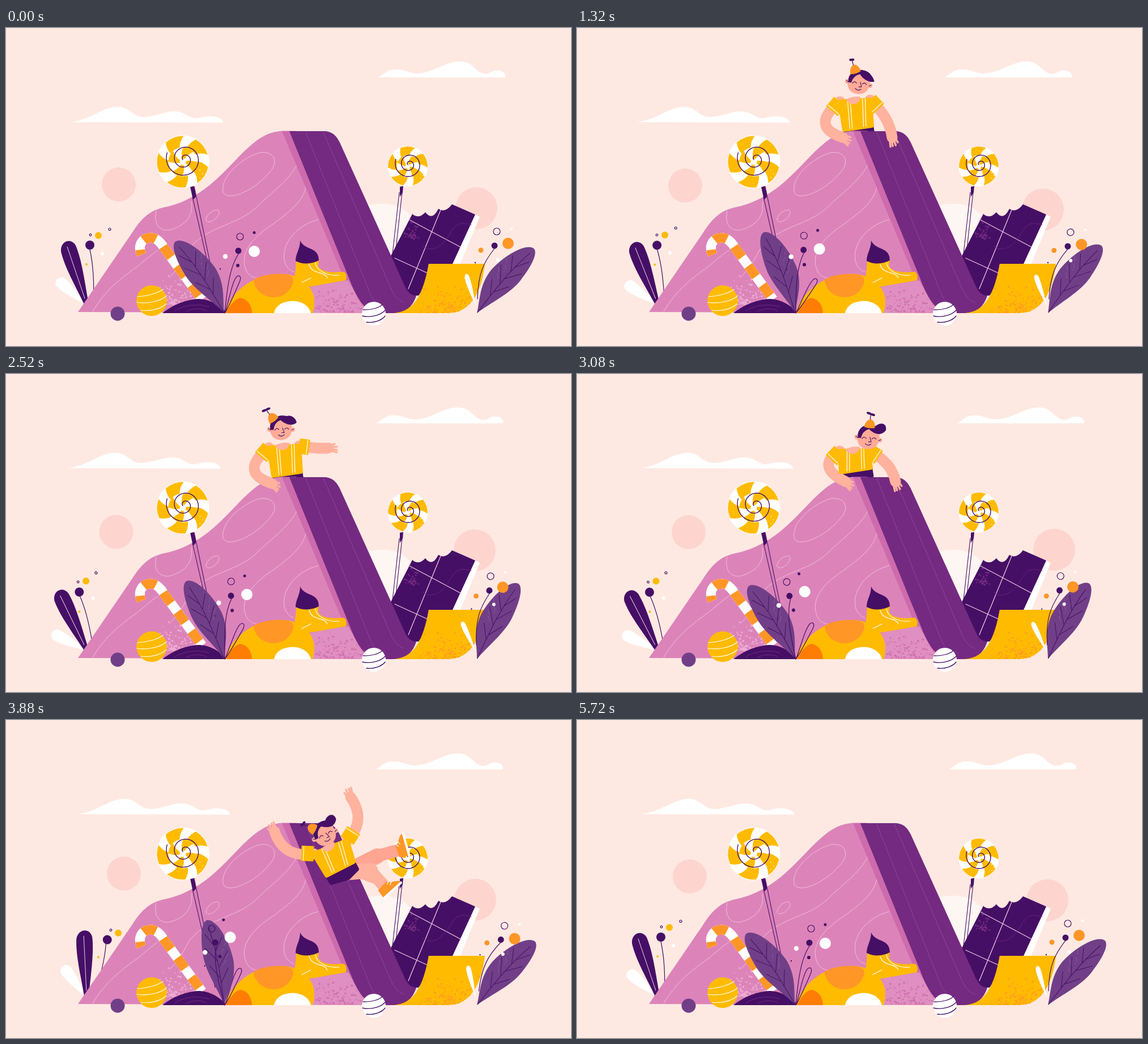
Write an HTML page with a canvas that moves like this. It is 997x561 px and loops after 5.76 s.

```html
<!DOCTYPE html>
<html lang="en">
<head>
<meta charset="utf-8">
<title>Candy slide</title>
<style>
html, body { margin: 0; width: 100%; height: 100%; overflow: hidden; background: #fee9e2; }
canvas { display: block; width: 997px; height: 561px; }
</style>
</head>
<body>
<canvas id="stage" width="997" height="561"></canvas>
<script>
const c = document.getElementById('stage').getContext('2d');
const LOOP = 5760, STEP = 40;
const SKY = '#fee9e2', WHITE = '#fff', DARK = '#460f66', PURPLE = '#742a80', LEAF = '#713f87',
  PINK = '#dc84b9', PALE = '#f2bbde', GOLD = '#ffbb00', ORANGE = '#ff9626', SKIN = '#ffb29e', BLUSH = '#fdd5ce';

// ---------- drawing helpers ----------
const paths = {};
const path = d => paths[d] || (paths[d] = new Path2D(d));
const fill = (d, color) => { c.fillStyle = color; c.fill(path(d)); };
const line = (d, color, w = 1.2) => {
  c.strokeStyle = color; c.lineWidth = w; c.lineCap = 'round'; c.stroke(path(d));
};
const disc = (x, y, r, color) => {
  c.fillStyle = color; c.beginPath(); c.arc(x, y, r, 0, 7); c.fill();
};
function at(x, y, deg, draw, scale = 1) {
  c.save(); c.translate(x, y); c.rotate(deg * Math.PI / 180); c.scale(scale, scale); draw(); c.restore();
}
function poly(pts, color) {
  c.fillStyle = color; c.beginPath();
  pts.forEach(p => c.lineTo(p[0], p[1]));
  c.closePath(); c.fill();
}
function limb(pts, w, color, cap = 'round') {
  c.strokeStyle = color; c.lineWidth = w; c.lineCap = cap; c.lineJoin = 'round';
  c.beginPath(); pts.forEach(p => c.lineTo(p[0], p[1])); c.stroke();
}
function speckle(shape, x, y, rx, ry, n, color) {
  let seed = x * 31 + y;
  const rnd = () => (seed = (seed * 16807 + 11) % 2147483647) / 2147483647;
  c.save(); c.clip(path(shape));
  for (let i = 0; i < n; i++) {
    const gx = rnd() + rnd() - 1, gy = 1 - 2 * rnd() * rnd();
    disc(x + gx * rx, y + gy * ry, .6 + rnd() * 1.3, color);
  }
  c.restore();
}

// ---------- motion helpers ----------
// Monotone cubic through the keys, so held values stay put.
function curve(ts, vs, t) {
  const last = ts.length - 1;
  if (t <= ts[0]) return vs[0];
  if (t >= ts[last]) return vs[last];
  let i = 0;
  while (t >= ts[i + 1]) i++;
  const slope = k => (vs[k + 1] - vs[k]) / (ts[k + 1] - ts[k]);
  const tangent = k => {
    if (k === 0 || k === last) return 0;
    const a = slope(k - 1), b = slope(k);
    return a * b <= 0 ? 0 : 2 * a * b / (a + b);
  };
  const h = ts[i + 1] - ts[i], u = (t - ts[i]) / h, v = 1 - u;
  return vs[i] * (1 + 2 * u) * v * v + tangent(i) * h * u * v * v
    + vs[i + 1] * u * u * (3 - 2 * u) - tangent(i + 1) * h * u * u * v;
}
const times = [0, 300, 640, 1340, 2040, 3080, 3880, 4520, LOOP];
const sway = {
  cloudL: [0, -8, -14, -8, -6, -2, 12, -14, 0],
  cloudR: [0, 0, 0, -8, -18, 14, -4, 12, 0],
  sunLx: [0, -6, -11, -8, -6, -2, 9, -12, 0],
  sunLy: [0, 1, 2, 2, 2, 3, -5, -1, 0],
  sunRx: [0, 0, 0, -8, -15, 12, -2, 10, 0],
  sunRy: [0, 6, 10, 2, -5, -8, -1, 2, 0],
  leafL: [-17, -25, -17, -20, -22.5, -25.5, -1, -15, -17],
  budL: [-48, -62, -35, -55, -60, -63, -36, -47, -48],
  stemL: [0, -8, 14.4, -4, -8.8, -11, 17, 2.2, 0],
  leafC: [-34, -28, -22, -21, -20.5, -32, -11, -20, -34],
  stemC: [0, -8, -23, -5, 1, -18, -21, 5, 0],
  loopC: [20, 27, 33, 30, 28, 24, 22, 21, 20],
  leafR: [41, 35, 17, 38, 29, 28, 42, 41.5, 41],
  stemR: [0, -6, -15.6, 2, -3, -5, 5.5, 3, 0],
  budR: [-17, -24, -30, -20, -23, -26, -14, -15, -17]
};

// ---------- scenery ----------
const HILL = 'M127 501L222 362C238 337 252 323 276 317C350 303 388 248 422 216C447 192 466 181.5 492 181.5H512L645 503Z';
const SLIDE = 'M500 182H560C576 182 583 190 589 202L704 456C709 467 716 472 724 472C718 492 704 503 688 503H658C636 503 622 480 612 458Z';
const RAMP = 'M746 416H845C841 450 830 485 803 498C794 503 780 503 760 503H685C720 500 736 470 746 416Z';
const CHOC = 'M717 328Q728 338 740 325Q752 341 763 319Q775 327 787 311L828 329L788 416H746C742 440 738 460 728 472H708L676 408Z';
const PATCH = 'M538 456L604 445L624 484L640 502H538Z';

function backdrop(s) {
  c.fillStyle = SKY; c.fillRect(0, 0, 997, 561);
  disc(199 + s.sunLx, 276 + s.sunLy, 30, BLUSH);
  disc(830 + s.sunRx, 318 + s.sunRy, 37, BLUSH);
  at(s.cloudL, 0, 0, () => fill('M114 166C150 162 170 139 197 139C220 139 222 158 245 157C265 156 280 147 297 147C318 147 322 161 338 159C350 157 354 155 364 156C376 157 383 161 383 167Z', WHITE));
  at(s.cloudR, 0, 0, () => fill('M657 87C668 81 672 73 688 73C705 73 712 81 727 80C755 79 775 59 801 59C826 59 828 80 846 81C855 81 856 75 867 75C877 75 882 80 881 87Z', WHITE));
  fill('M634 314C655 308 682 308 698 318C708 324 714 330 716 337L684 410Z', '#fef6f3');
}

// Two checkered rings of curved wedges under a spiral line.
function lolli(x, y, r, turn) {
  disc(x, y, r, WHITE);
  at(x, y, turn, () => {
    const p = (rad, a) => [Math.cos(a) * rad, Math.sin(a) * rad];
    const wedge = (r0, r1, a0, w, twist) => {
      const mid = (r0 + r1) / 2, a1 = a0 + twist;
      c.fillStyle = GOLD; c.beginPath();
      c.arc(0, 0, r0, a0 + w, a0, true);
      c.quadraticCurveTo(...p(mid, a0 + twist * .2), ...p(r1, a1));
      c.arc(0, 0, r1, a1, a1 + w);
      c.quadraticCurveTo(...p(mid, a0 + w + twist * .2), ...p(r0, a0 + w));
      c.fill();
    };
    for (let i = 0; i < 5; i++) wedge(r * .55, r * .98, i * Math.PI * .4, .76, .25);
    for (let i = 0; i < 4; i++) wedge(r * .12, r * .55, i * Math.PI * .5 + .7, .8, .3);
  });
  c.strokeStyle = DARK; c.lineWidth = 1.4; c.lineCap = 'round'; c.beginPath();
  for (let i = 0; i <= 90; i++) {
    const k = i / 90, a = 3.5 - k * 13.2, rad = r * (.64 * (1 - k) + .06);
    c.lineTo(x + r * .06 + Math.cos(a) * rad, y - r * .1 + Math.sin(a) * rad);
  }
  c.stroke();
  for (let i = 0; i < 7; i++) disc(x + r * (.6 + .05 * (i % 4)), y + r * (.25 + .07 * i), .8, i % 2 ? WHITE : GOLD);
}

function hill() {
  fill(HILL, PINK);
  c.save(); c.clip(path(HILL));
  [
    'M383 280C386 255 420 228 447 220C470 216 480 232 470 248C455 270 425 292 400 296C386 297 381 292 383 280',
    'M353 338C354 328 366 320 374 321C381 325 370 341 358 342C354 342 353 340 353 338',
    'M265 323C260 345 270 360 290 356C318 348 331 330 327 306',
    'M153 500C175 462 205 440 230 422C245 410 258 398 268 392',
    'M518 232C503 268 470 288 440 318C405 350 350 350 322 392C310 415 300 430 288 440',
    'M530 262C534 300 505 320 474 344C430 372 412 400 424 428C430 440 440 442 455 442',
    'M551 338C515 347 486 378 491 410C493 420 500 428 508 430'
  ].forEach(d => line(d, PALE, 1));
  c.restore();
  fill('M487 182H501L613 458L600 450Z', '#cd6bad');
  fill(PATCH, '#df8fc1');
  speckle(PATCH, 585, 480, 60, 34, 260, '#d070af');
  speckle(HILL, 300, 462, 55, 26, 150, '#ecadd5');
}

function slide() {
  fill(SLIDE, PURPLE);
  line('M529 184L640 462C646 478 652 488 668 490', '#8a479a', 1);
  line('M560 184L676 452C682 468 690 480 702 484', '#8a479a', 1);
}

function chocolate() {
  poly([[826, 328], [836, 333], [801, 417], [788, 417]], WHITE);
  fill(CHOC, DARK);
  line('M711 338L803 387M686 406L743 432M767 321L710 460', '#e9c9df', 1.3);
  line('M735 385C752 398 772 384 784 362S808 344 821 347', '#672379', 1);
  speckle(CHOC, 716, 352, 16, 20, 40, '#742a80');
}

function ramp() {
  fill(RAMP, GOLD);
  speckle(RAMP, 785, 478, 66, 28, 260, '#ffa01e');
}

function cane() {
  const d = 'M239 400C231 380 243 370 255 370C266 370 273 378 279 388L346 479';
  c.lineCap = 'butt'; c.lineWidth = 17;
  c.strokeStyle = WHITE; c.stroke(path(d));
  c.strokeStyle = ORANGE; c.setLineDash([23, 19]); c.lineDashOffset = 14;
  c.stroke(path(d)); c.setLineDash([]);
}

function sweets() {
  fill('M326 281L333 279L337 299L371 472H368L330 301Z', '#d77fb5');
  line('M329 298L369 472M336 298L372 472', DARK, 1.1);
  fill('M325 280L332 279L336 297L330 303Z', DARK);
  lolli(312, 236, 46.5, -146);
  cane();
  fill('M276 503C300 484 325 478 342 478C362 479 378 490 390 503Z', DARK);
  line('M298 499C315 488 340 486 358 492M318 500C330 494 345 494 354 499', PURPLE, 1);

  fill('M386 503C395 470 430 436 480 434C522 432 544 458 544 482C544 495 541 503 541 503Z', GOLD);
  fill('M512 406C512 425 509 440 507 452L538 456L600 445C602 437 600 431 595 430C576 432 556 431 551 420L552 406Z', GOLD);
  fill('M437 444C447 437 470 433 488 434C503 435 508 440 507 446C504 466 486 476 470 475C450 473 438 460 437 444Z', ORANGE);
  fill('M388 503C394 490 404 478 413 476C428 478 434 492 434 503Z', '#ff7d05');
  fill('M473 503C476 488 490 482 506 481.5C522 482 535 490 538 503Z', WHITE);
  fill('M519 375C519 390 511 398 511 411C525 418 540 416 552 410C552 396 544 392 534 388C527 385 522 381 519 375Z', DARK);
  line('M535 417C540 436 562 428 567 441M546 414C548 430 570 438 588 436M522 449L538 441', WHITE, 1.2);
}

function balls() {
  disc(197, 504, 12.5, LEAF);
  disc(257, 481, 27, GOLD);
  line('M232 474C250 473 268 468 277 461M231 484C250 487 272 482 283 473M238 498C255 500 272 496 282 487', WHITE, 1.1);
  disc(649, 504, 21, WHITE);
  line('M630 497C645 498 659 493 664 488M629 508C646 512 663 505 669 498M636 519C650 521 664 515 669 508', DARK, 1.3);
}

// ---------- plants ----------
function dots(list) {
  list.forEach(([x, y, r, color, ring]) => {
    if (!ring) return disc(x, y, r, color);
    c.strokeStyle = color; c.lineWidth = 1.2; c.beginPath(); c.arc(x, y, r, 0, 7); c.stroke();
  });
}
function bigLeaf(flip) {
  c.scale(flip, 1);
  fill('M0 0C-6 -30 -22 -65 -20 -95C-18 -130 -11 -151 -1 -152C15 -151 30 -112 31 -75C30 -40 10 -20 0 0Z', LEAF);
  line('M0 -2C3 -50 6 -90 -1 -140M2 -38L19 -62M3 -66L24 -92M3 -95L19 -118M2 -48L-12 -72M3 -78L-14 -104M2 -106L-10 -128', DARK, 1);
  for (let i = 0; i < 14; i++) disc(12 + (i * 7) % 13, -70 - (i * 11) % 42, .7, '#9a70ab');
}
function leftPlant(s) {
  at(139, 487, s.budL, () => fill('M0 0C-5 -20 -12 -44 -10 -58C-8 -68 8 -68 10 -57C11 -44 6 -20 3 0Z', WHITE));
  at(148, 488, s.stemL, () => {
    line('M0 -97C6 -70 8 -40 6 0', DARK, 1.2);
    dots([[0, -105, 8, DARK], [15, -122, 6, GOLD], [1, -123, 1.8, DARK, 1], [35, -133, 2, DARK, 1],
      [22, -90, 3, WHITE], [-6, -71, 2, GOLD]]);
  });
  at(141, 487, s.leafL, () => {
    fill('M-3 0C-8 -35 -17 -72 -15 -101C-12 -119 9 -121 13 -104C16 -76 9 -35 5 0Z', DARK);
    line('M1 -10C0 -45 -1 -75 -2 -106', '#e7cfe6', 1);
  });
}
function midPlant(s) {
  at(387, 502, s.loopC, () => line('M0 0C-2 -25 -7 -55 -3 -66C1 -73 6 -68 5 -58C4 -40 3 -20 0 0', DARK, 1.2));
  at(385, 502, s.leafC, () => bigLeaf(1));
  at(388, 503, s.stemC, () => {
    line('M22 -104C6 -80 2 -40 -2 0', DARK, 1.2);
    dots([[22, -110, 5.5, DARK], [25, -135, 6, DARK, 1], [50, -142, 2.5, DARK], [50, -109, 10, WHITE],
      [-1, -100, 4.2, WHITE], [21, -84, 3, DARK], [-10, -78, 1.2, DARK]]);
  });
}
function rightPlant(s) {
  at(829, 490, s.budR, () => fill('M0 0C-3 -20 -6 -45 -4 -54C-2 -60 3 -60 4 -53C5 -40 2 -18 0 0Z', WHITE));
  at(831, 503, s.leafR, () => bigLeaf(-1));
  at(831, 503, s.stemR, () => {
    line('M31 -114C12 -90 2 -70 1 -25', DARK, 1.2);
    dots([[31, -119, 5.5, DARK], [55, -123, 10, ORANGE], [35, -144, 6, DARK, 1], [7, -111, 4.5, ORANGE],
      [37, -94, 3, WHITE], [-3, -89, 1.2, DARK], [61, -149, 2.2, WHITE]]);
  });
}

// ---------- boy ----------
// s shoulder, h hip, e elbow, w wrist, k knee, f foot; head: x, y, tilt, cap tilt, quiff
const stand = {
  sL: [464, 130], sR: [517, 127], hR: [520, 172], hL: [472, 179],
  eL: [431, 169], wL: [469, 193], eR: [546, 158], wR: [556, 193],
  head: [497, 98, 8, -16, 0],
  kA: [500, 220], fA: [500, 250], kB: [510, 220], fB: [510, 250]
};
const wave = { ...stand, head: [481, 98, -8, -45, .6], eR: [548, 113], wR: [576, 89] };
const waveBack = { ...wave, eR: [545, 108], wR: [566, 76], head: [483, 98, -5, -40, .6] };
const crouch = {
  ...stand, sL: [464, 136], sR: [514, 135], hR: [518, 165], hL: [466, 173],
  eL: [438, 163], wL: [474, 190], eR: [549, 158], wR: [562, 190], head: [514, 114, 5, 6, 1]
};
const ride = {
  sL: [543, 236], sR: [602, 213], hR: [613, 250], hL: [566, 274],
  eL: [497, 234], wL: [474, 197], eR: [625, 176], wR: [608, 136],
  head: [563, 203, -25, -63, 1],
  kA: [643, 266], fA: [671, 297], kB: [655, 240], fB: [698, 228]
};
const tuck = {
  sL: [916, 163], sR: [946, 161], hR: [946, 192], hL: [908, 196],
  eL: [948, 182], wL: [962, 176], eR: [962, 172], wR: [975, 176],
  head: [964, 137, 4, -2, 1],
  kA: [974, 179], fA: [953, 240], kB: [1004, 204], fB: [970, 262]
};
const move = (pose, dx, dy) => Object.fromEntries(
  Object.entries(pose).map(([k, [x, y, ...rest]]) => [k, [x + dx, y + dy, ...rest]]));
const hop = { ...move(crouch, 14, -34), kA: [565, 165], fA: [575, 195], kB: [575, 160], fB: [592, 190] };

const keys = [
  [120, move(stand, 0, 145)], [480, move(stand, 0, -4)], [640, stand], [1400, stand],
  [1680, wave], [1860, waveBack], [2040, wave], [2220, waveBack], [2400, wave],
  [2700, stand], [3080, crouch], [3320, hop], [3640, move(ride, -35, -75)], [3880, ride],
  [4020, move(ride, 100, 195)], [4100, move(ride, 180, 185)], [4200, move(ride, 255, 90)],
  [4360, move(tuck, -42, 45)], [4520, tuck], [4640, move(tuck, 45, 30)], [4800, move(tuck, 130, 180)]
];
const keyTimes = keys.map(k => k[0]);
const poseAt = t => Object.fromEntries(Object.keys(stand).map(name =>
  [name, stand[name].map((_, i) => curve(keyTimes, keys.map(k => k[1][name][i]), t))]));
const mix = (a, b, k) => [a[0] + (b[0] - a[0]) * k, a[1] + (b[1] - a[1]) * k];
const angle = (a, b) => Math.atan2(b[1] - a[1], b[0] - a[0]) * 180 / Math.PI;

function hand(e, w) {
  at(w[0], w[1], angle(e, w), () => {
    disc(1, 0, 8.5, SKIN);
    [-6, -2, 2.5, 6].forEach((y, i) => limb([[2, y * .8], [i === 0 ? 11 : 15, y * 1.2]], 3.6, SKIN));
  });
}
function arm(s, e, w) {
  const bend = mix(mix(s, w, .5), e, 1.6);
  c.strokeStyle = SKIN; c.lineWidth = 19; c.lineCap = 'round'; c.beginPath();
  c.moveTo(...s); c.quadraticCurveTo(...bend, ...w); c.stroke();
  hand(e, w);
}
function sleeve(s, e) {
  const len = Math.hypot(e[0] - s[0], e[1] - s[1]) || 1, end = mix(s, e, Math.min(.6, 22 / len));
  limb([s, end], 27, GOLD, 'butt');
  at(end[0], end[1], angle(s, e), () => line('M-4 -12V12', WHITE, 1.2));
}
function leg(hip, k, f, color) {
  poly([hip, k, f], color);
  limb([hip, k], 27, color);
  limb([k, f], 22, color);
  at(f[0], f[1], angle(k, f) - 90, () => {
    fill('M-13 -7L8 -9C11 -1 24 0 27 9H-15Z', ORANGE);
    fill('M-16 8H28V10Q28 12 25 12H-16Z', WHITE);
    line('M6 -4L11 -7M9 0L15 -3', WHITE, 1.2);
  });
}
function face([x, y, tilt, cap, quiff], t) {
  at(x, y, tilt, () => {
    disc(-22, -1, 4.5, SKIN); disc(22, 1, 4.5, SKIN);
    fill('M-20 -12C-10 -23 14 -22 20 -10C23 6 17 19 0 20C-16 20 -24 8 -20 -12Z', '#ffab98');
    const q = quiff;
    c.fillStyle = DARK; c.beginPath(); c.moveTo(-20, 0);
    c.bezierCurveTo(-23, -22, -4, -30, 12, -25);
    c.bezierCurveTo(18 + 3 * q, -24 - 10 * q, 27 + 6 * q, -14 - 18 * q, 29 + 3 * q, -8 - 11 * q);
    c.bezierCurveTo(22 + 3 * q, -4 - 3 * q, 8 + 4 * q, -8, 0, -18);
    c.quadraticCurveTo(-12, -14, -14, 0);
    c.fill();
    line('M-12 1Q-8 -5 -4 0M7 0Q11 -5 15 0M3 -3L6 6L1 6M-5 10Q0 15 6 10', DARK, 1.2);
    line('M-24 -3L-20 0M24 0L20 2', DARK, 1.1);
  }, .93);
  at(x, y, cap, () => {
    fill('M-10 -21C-9 -31 -3 -36 1 -36C7 -35 10 -29 10 -21Q0 -18 -10 -21Z', ORANGE);
    line('M0 -36V-46', DARK, 1.3);
    const w = Math.cos(t / 90) * 8;
    at(0, -46, 14, () => {
      [w / 2, -w / 2].forEach(dx => {
        c.fillStyle = DARK; c.beginPath();
        c.ellipse(dx, 0, Math.abs(w / 2) + .8, 2.2, 0, 0, 7); c.fill();
      });
    });
  }, .95);
}
function boy(p, t) {
  const mid = mix(p.hL, p.hR, .55), chest = mix(p.sL, p.sR, .5);
  const len = Math.hypot(mid[0] - chest[0], mid[1] - chest[1]) || 1;
  const down = [(mid[0] - chest[0]) / len, (mid[1] - chest[1]) / len];
  const below = (q, d) => [q[0] + down[0] * d, q[1] + down[1] * d];
  const hip = below(mid, 10);
  leg(hip, p.kB, p.fB, '#ffa592');
  leg(hip, p.kA, p.fA, SKIN);
  const seat = [p.hL, p.hR, below(p.hR, 15), below(mix(p.hL, p.hR, .6), 22), below(p.hL, 16)];
  poly(seat, DARK); limb([...seat, p.hL], 6, DARK);
  arm(p.sR, p.eR, p.wR);
  arm(p.sL, p.eL, p.wL);
  const shirt = [p.sL, p.sR, p.hR, p.hL];
  poly(shirt, GOLD); limb([...shirt, p.sL], 8, GOLD);
  sleeve(p.sR, p.eR); sleeve(p.sL, p.eL);
  [.26, .35, .76, .85].forEach(k => {
    limb([below(mix(p.sL, p.sR, k), -3), mix(p.hL, p.hR, k - .06)], 1.2, WHITE);
  });
  const neck = below(mix(p.sL, p.sR, .46), -4);
  at(neck[0], neck[1], Math.atan2(down[1], down[0]) * 180 / Math.PI - 90,
    () => fill('M-13 -1Q0 -5 13 -1C10 13 -9 13 -13 -1Z', SKIN));
  face(p.head, t);
}

// ---------- frame ----------
function draw(t) {
  const s = {};
  for (const k in sway) s[k] = curve(times, sway[k], t);
  const out = t >= 120 && t < 4800, behind = t < 3300;
  const p = out && poseAt(t);

  backdrop(s);
  leftPlant(s);
  if (out && behind) boy(p, t);
  line('M694 290L681 408M699 290L686 408', DARK, 1.1);
  fill('M695 280L701 279L700 290L695 298Z', DARK);
  lolli(709, 244, 35.5, -126);
  hill();
  chocolate();
  slide();
  ramp();
  if (out && behind && t > 360) {
    // hands hang over the ledge
    c.save(); c.beginPath(); c.rect(0, 176, 997, 100); c.clip();
    arm(p.sL, p.eL, p.wL);
    arm(p.sR, p.eR, p.wR);
    c.restore();
  }
  sweets();
  if (out && !behind) boy(p, t);
  midPlant(s);
  balls();
  rightPlant(s);
}

const start = performance.now();
function tick(now) {
  const t = Math.max(0, now - start) % LOOP;
  draw(Math.floor(t / STEP) * STEP);
  requestAnimationFrame(tick);
}
draw(0);
requestAnimationFrame(tick);
</script>
</body>
</html>
```
